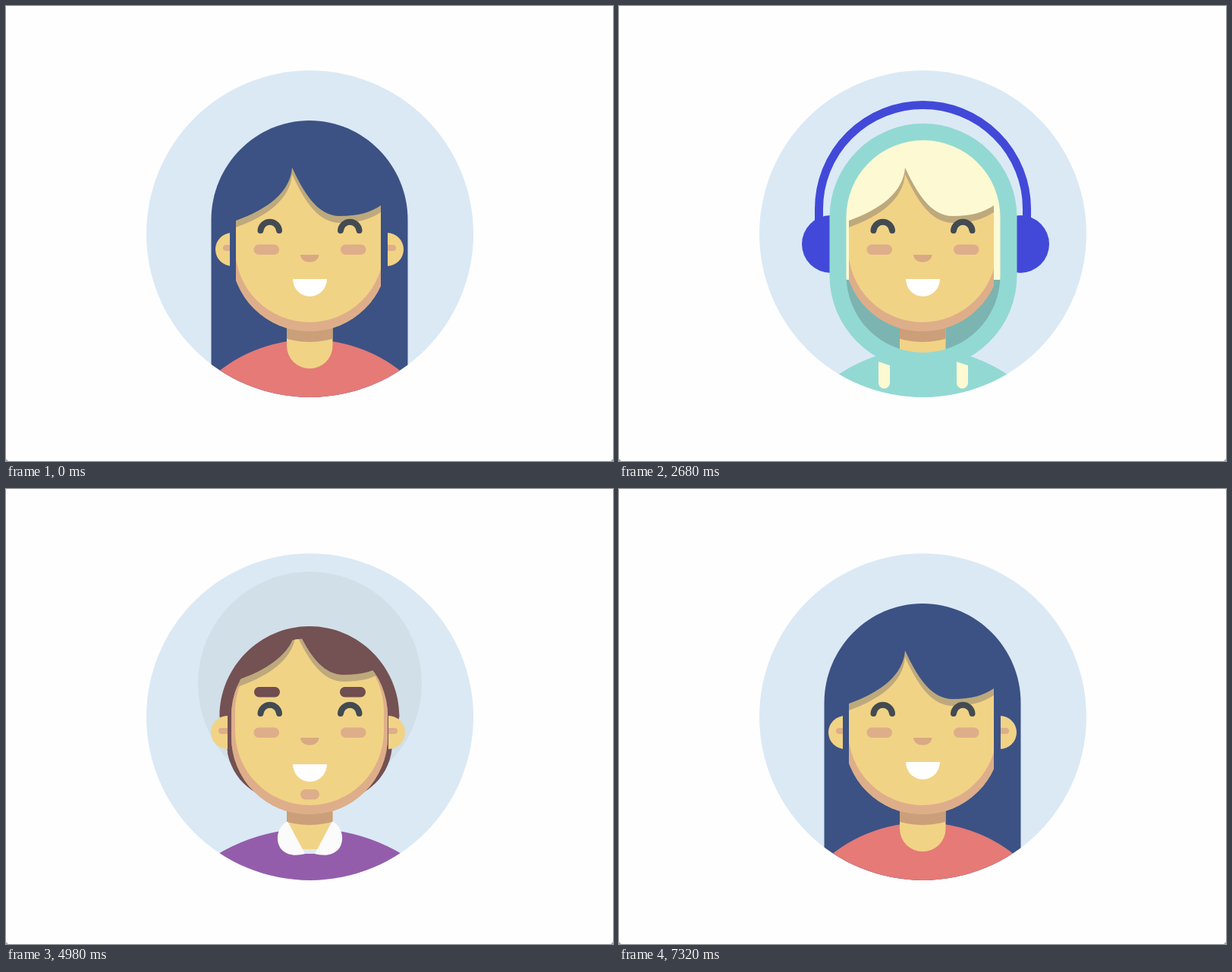
Animation, 800 px wide and 600 px high, one loop 7340 ms. Source, as an HTML page with a canvas:

```html
<!DOCTYPE html>
<html>
<head>
<meta charset="utf-8">
<style>
  html, body { margin: 0; width: 100%; height: 100%; overflow: hidden; background: #fefefe; }
  canvas { display: block; }
</style>
</head>
<body>
<canvas id="stage" width="800" height="600"></canvas>
<script>
const g = document.getElementById('stage').getContext('2d');
const LOOP = 7340;
const SKIN = '#f1d386', JAW = '#deae8a', BROWN = '#745153', DARK = '#674447', NAVY = '#3c5284', TEAL = '#93d9d3';
const navy = [60, 82, 132], brown = [116, 81, 83], teal = [147, 217, 211];

// hair: half width, top, side y, bottom, corner radius, lower half width, roundness
// sides: face edges; strip: outer edges of the hair before the ears
// ears: left x, right x, radius; body: centre y, radius; fringe: offset
const woman = {
  hair: [129.5, 151, 282, 530, 0, 129.5, .55], tint: navy, fringe: [0, 0], top: 197, sides: [303, 494],
  strip: [295, 503], ears: [298, 502, 22], neck: [478, 30], body: [634, 194], cloth: [229, 122, 119],
  mouth: 360, brow: 0, chin: 0
};
const man = {
  hair: [109.5, 190, 295, 431, 66, 105, .6], tint: brown, fringe: [5, -140], top: 197, sides: [297, 503],
  strip: [290, 509], ears: [292, 504, 22], neck: [441, 0], body: [685, 237], cloth: [118, 184, 106],
  mouth: 363, brow: 1, chin: 1
};
const poses = [
  woman,
  { ...woman, hair: [129, 160, 290, 439, 70, 129, .55], sides: [306, 493], strip: [298, 502], cloth: teal },
  { ...woman, hair: [110, 170, 280, 361, 0, 110, .55], tint: [253, 249, 210], strip: [290, 510], ears: [320, 480, 0], neck: [458, 0], body: [652, 200], cloth: teal },
  man,
  { ...man, hair: [118.5, 181, 300, 410, 75, 109, .55], fringe: [5, -32], strip: [292, 504], cloth: [148, 93, 171] },
  { ...man, top: 207, ears: [295, 502, 21], body: [619, 193], cloth: [241, 211, 134], chin: 0 }
];
const changes = [[300, 1000], [1520, 2240], [3000, 3800], [4250, 4850], [5250, 6050], [6780, 7280]];

const mix = (a, b, p) => Array.isArray(a) ? a.map((v, i) => mix(v, b[i], p)) : a + (b - a) * p;
const smooth = p => p * p * (3 - 2 * p);
const clamp = v => Math.max(0, Math.min(1, v));
const rgb = c => `rgb(${c.map(Math.round)})`;

function fill(path, color, rule = 'nonzero') {
  g.fillStyle = color;
  g.fill(typeof path === 'string' ? new Path2D(path) : path, rule);
}
function stroke(path, color, width) {
  g.strokeStyle = color;
  g.lineWidth = width;
  g.lineCap = 'round';
  g.stroke(new Path2D(path));
}
function rounded(x, y, w, h, r = 0) {
  const p = new Path2D();
  p.roundRect(x, y, w, h, r);
  return p;
}
const pill = (x, y, w, h, r, color) => fill(rounded(x, y, w, h, r), color);
function disc(x, y, r, color) {
  g.fillStyle = color;
  g.beginPath();
  g.arc(x, y, Math.max(0, r), 0, 7);
  g.fill();
}
function group(draw, alpha = 1) {
  g.save();
  g.globalAlpha *= alpha;
  draw();
  g.restore();
}
function both(draw) {
  draw();
  group(() => { g.translate(801, 0); g.scale(-1, 1); draw(); });
}
// Scales a part in with a slight overshoot
function pop(k, x, y, draw) {
  if (k <= 0) return;
  group(() => {
    const s = k + .15 * Math.sin(Math.PI * k);
    g.translate(x, y);
    g.scale(s, s);
    g.translate(-x, -y);
    draw();
  }, Math.min(1, k * 2));
}

function hairPath([w, t, s, b, r, v, k]) {
  const c = 400, q = .45 * r, shoulder = s - k * (s - t);
  return new Path2D(`M${c - w} ${s}C${c - w} ${shoulder} ${c - k * w} ${t} ${c} ${t}`
    + `C${c + k * w} ${t} ${c + w} ${shoulder} ${c + w} ${s}L${c + v} ${b - r}`
    + `C${c + v} ${b - q} ${c + v - q} ${b} ${c + v - r} ${b}H${c - v + r}`
    + `C${c - v + q} ${b} ${c - v} ${b - q} ${c - v} ${b - r}Z`);
}
// Everything below the edge of the fringe
function belowFringe([dx, dy]) {
  const edge = new Path2D('M250 300L303 283C345 268 375 245 377 213C392 245 410 277 440 277C465 277 480 272 494 263L540 230V700H250Z');
  const p = new Path2D();
  p.addPath(edge, new DOMMatrix([1, 0, 0, 1, dx, dy]));
  return p;
}

function drawFace({ top, sides: [left, right], fringe: [dx, dy] }) {
  group(() => {
    g.clip(rounded(left, 180, right - left, 260));
    g.clip(rounded(297, top, 206, 429 - top, 102));
    g.clip(belowFringe([dx, dy]));
    pill(280, 180, 240, 260, 0, '#bda97c');
    g.clip(belowFringe([dx, dy + 9]));
    pill(280, 180, 240, 260, 0, JAW);
    pill(302, 195, 196, 222, 98, SKIN);
  });
}
function headphones() {
  stroke('M263.5 285V267.5A137 137 0 0 1 537.5 267.5V285', '#4249d9', 11);
  disc(279, 314, 38, '#4249d9');
  disc(529, 314, 38, '#4249d9');
}
function hoodRing() {
  const ring = rounded(277.5, 155, 247, 324, 123.5);
  ring.addPath(rounded(299.5, 177, 203, 280, 101.5));
  fill(ring, TEAL, 'evenodd');
  for (const x of [342, 445]) fill(`M${x} 469L${x + 15} 474V497a7.5 7.5 0 0 1-15 0Z`, '#fdf9d2');
}
function glasses(color) {
  const lens = 'M300 296C300 275 308 267 335 267H365C388 268 395.5 280 395.5 297C395.5 324 376 343.5 348 343.5C320 343.5 300 322 300 296Z';
  both(() => {
    fill(lens, 'rgba(248,235,210,.4)');
    stroke(lens, color, 5);
  });
  fill('M335 264.5H466L440 269Q409 271 407 287H394Q392 271 361 269Z', color);
  stroke('M313 288Q315 278 325 277', '#fff', 5);
}
function redGlasses() {
  group(() => {
    g.translate(399, 370);
    g.scale(.953, .953);
    g.translate(-400, -370);
    glasses('#d45a5c');
  }, .85);
  const above = rounded(270, 150, 260, 142);
  above.addPath(belowFringe([0, 0]));
  g.clip(above, 'evenodd');
  g.clip(rounded(270, 150, 260, 142));
  g.beginPath();
  g.ellipse(404, 270, 104, 75, 0, 0, 7);
  g.fillStyle = '#3a4c86';
  g.fill();
}
const collar = color => both(() => fill('M371 438C358 445 354 462 362 474C370 484 383 484 394 481Z', color));
function openCollar() {
  fill('M370 436L390 482L400 509L410 482L430 436Z', SKIN);
  collar('#64a159');
}
function whiteCollar() {
  fill('M370 436L390 481H411L430 436Z', '#dfe9f0');
  fill('M370 436L389 475H412L430 436Z', SKIN);
  collar('#fbfbfb');
}
function overalls() {
  both(() => {
    pill(311, 448, 19, 70, 0, NAVY);
    pill(311, 486, 90, 40, 0, NAVY);
    disc(321, 488, 6, '#fff');
  });
}
function bun() {
  disc(401, 163, 31, BROWN);
  group(() => {
    g.clip(rounded(370, 132, 62, 62, 31));
    disc(372, 163, 30, DARK);
  });
  pill(375, 181, 51, 12, 4, TEAL);
}
function beard() {
  both(() => fill('M291 290L298 305C302 345 308 365 320 376L401 370V480.5C340 480.5 283 440 283 378C283 360 288 350 291 330Z', BROWN));
  both(() => fill('M323 371C330 377 340 374 347 367C355 350 370 337 383 337C392 337 396 338 401 338V364H382C365 375 360 396 343 396C332 397 324 385 323 371Z', DARK));
}

function draw(time) {
  let from = 0, p = 0;
  changes.forEach(([a, b], i) => {
    if (time >= a) { from = i; p = smooth(clamp((time - a) / (b - a))); }
  });
  const to = (from + 1) % poses.length;
  const now = {};
  for (const key in woman) now[key] = mix(poses[from][key], poses[to][key], p);
  const shown = i => i === from ? 1 - p : i === to ? p : 0;
  const hair = hairPath(now.hair), tint = rgb(now.tint);

  pill(0, 0, 800, 600, 0, '#fefefe');
  fill('M0 597L3 600H0ZM800 597L797 600H800Z', '#aaa');
  g.save();
  g.clip(rounded(185, 85, 431, 431, 215.5));
  pill(180, 80, 440, 440, 0, '#dbe9f5');

  // Faint disc passing behind the head
  const halo = .075 * clamp(1 - Math.abs(time - 4980) / 200);
  disc(400.5, 256.5, 147.5, `rgba(85,100,75,${halo})`);

  pop(shown(2), 400, 314, () => {
    headphones();
    pill(285, 165, 230, 305, 115, '#7cb4b1');
  });
  fill(hair, tint);
  pop(shown(5), 401, 190, bun);
  const [left, right, r] = now.ears;
  if (r > 1) {
    disc(left, 321, r, SKIN);
    disc(right, 321, r, SKIN);
    pill(left - r + 10, 315, 22, 8, 4, JAW);
    pill(right + r - 32, 315, 22, 8, 4, JAW);
  }
  disc(400.5, now.body[0], now.body[1], rgb(now.cloth));
  pop(shown(5), 400, 530, overalls);

  // Neck with the shadow of the chin
  const [base, round] = now.neck;
  pill(370, 410, 60.5, base - 410, [0, 0, round, round], SKIN);
  pop(shown(3), 400, 440, openCollar);
  pop(shown(4), 400, 440, whiteCollar);
  group(() => {
    g.clip(rounded(370, 400, 60.5, 50));
    pill(297, 220, 206, 223, 102, '#cb9f79');
  });

  group(() => {
    g.clip(hair);
    pill(now.strip[0], 290, now.strip[1] - now.strip[0], 71, 0, tint);
  });
  drawFace(now);

  both(() => pill(326.5, 314.5, 33.5, 13.5, 6.5, JAW));
  fill('M388 328H412.5C412 341 388.5 341 388 328Z', '#d9a983');
  group(() => pill(388, 396, 25, 13.5, 6.5, JAW), now.chin);
  group(() => both(() => pill(327, 261, 34, 13.5, 6.5, '#6f4d50')), now.brow);
  pop(shown(3), 400, 424, () => pill(381, 417, 39, 14, 6.5, BROWN));
  pop(shown(5), 400, 370, beard);

  fill(`M378 ${now.mouth}H423A22.5 23 0 0 1 378 ${now.mouth}Z`, '#fff');
  group(() => fill('M376 363H422L420 374Q400 369 379 374Z', '#98787b'), shown(5));
  pop(shown(1), 400, 300, redGlasses);
  pop(shown(3), 400, 300, () => glasses(NAVY));
  both(() => stroke('M335.5 296A12.3 12.3 0 0 1 360 296', '#434b52', 8));
  pop(shown(2), 400, 314, hoodRing);
  g.restore();
}

function tick() {
  draw(performance.now() % LOOP);
  requestAnimationFrame(tick);
}
tick();
</script>
</body>
</html>
```
